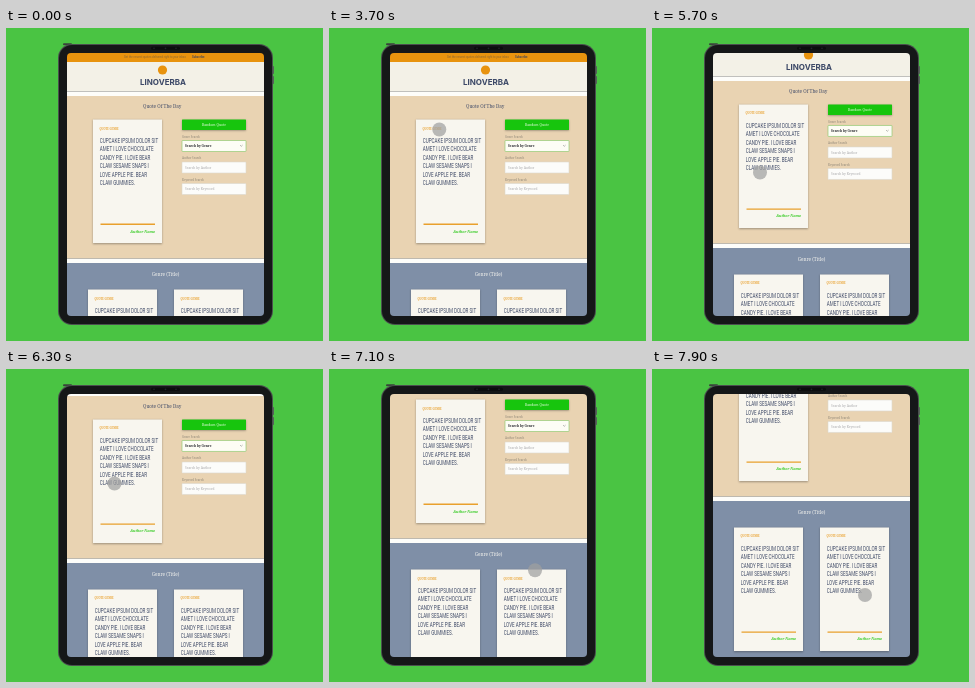
Write an HTML page with a canvas that moves like this. It is 317x313 px and loops after 8 s.

```html
<!DOCTYPE html>
<html lang="en">
<head>
<meta charset="utf-8">
<title>Quote page on a tablet</title>
<style>
  html, body { margin: 0; width: 100%; height: 100%; overflow: hidden; background: #4ac443; }
  canvas { display: block; width: 317px; height: 313px; }
</style>
</head>
<body>
<canvas id="stage"></canvas>
<script>
const W = 317, H = 313, LOOP = 8000;
const SERIF = '"Noto Serif", serif';
const SANS = 'Roboto, sans-serif';
const NAVY = '#414c69', ORANGE = '#e9a02c', PAPER = '#f8f6ef', GREEN = '#35cb22';
const QUOTE = [
  'CUPCAKE IPSUM DOLOR SIT',
  'AMET I LOVE CHOCOLATE',
  'CANDY PIE. I LOVE BEAR',
  'CLAW SESAME SNAPS I',
  'LOVE APPLE PIE. BEAR',
  'CLAW GUMMIES.'
];

const canvas = document.getElementById('stage');
const ctx = canvas.getContext('2d');
const dpr = window.devicePixelRatio || 1;
canvas.width = W * dpr;
canvas.height = H * dpr;

// Keys are [time, value]; smooth and without overshoot.
function track(keys) {
  const last = keys.length - 1;
  const slope = i => (keys[i + 1][1] - keys[i][1]) / (keys[i + 1][0] - keys[i][0]);
  const tangent = i => {
    if (i === 0 || i === last) return 0;
    const a = slope(i - 1), b = slope(i);
    return a * b > 0 ? 2 * a * b / (a + b) : 0;
  };
  return t => {
    if (t <= keys[0][0]) return keys[0][1];
    if (t >= keys[last][0]) return keys[last][1];
    let i = 0;
    while (t >= keys[i + 1][0]) i++;
    const [t0, v0] = keys[i], [t1, v1] = keys[i + 1];
    const d = t1 - t0, u = (t - t0) / d, w = 1 - u;
    return w * w * (1 + 2 * u) * v0 + u * u * (3 - 2 * u) * v1
      + d * u * w * (w * tangent(i) - u * tangent(i + 1));
  };
}

const scrollAt = track([[5100, 0], [5700, 15], [6300, 41], [6650, 56], [7000, 61], [7300, 61], [7900, 103], [8000, 106]]);
const touchX = track([[2600, 159], [3000, 163], [4000, 90], [4300, 84], [4900, 103], [5100, 103], [5700, 108], [6300, 108.5], [6600, 110], [7100, 206], [7350, 213], [8000, 213]]);
const touchY = track([[2600, 76.5], [3000, 77], [4000, 116], [4900, 159.5], [5100, 159.5], [5700, 144.5], [6300, 114.5], [6600, 99], [7100, 201], [7350, 264], [7900, 226], [8000, 223]]);
const touchR = track([[2600, 0], [3000, 7]]);
const arrowAlpha = track([[2050, 0], [2200, 1], [2650, 1], [2950, 0]]);

function box(x, y, w, h, fill, r = 0, stroke) {
  ctx.beginPath();
  ctx.roundRect(x, y, w, h, r);
  ctx.fillStyle = fill;
  ctx.fill();
  if (stroke) {
    ctx.strokeStyle = stroke;
    ctx.lineWidth = 0.6;
    ctx.stroke();
  }
}

function dot(x, y, r, fill) {
  ctx.beginPath();
  ctx.arc(x, y, r, 0, Math.PI * 2);
  ctx.fillStyle = fill;
  ctx.fill();
}

function text(str, x, y, font, fill, align = 'left') {
  ctx.font = font;
  ctx.fillStyle = fill;
  ctx.textAlign = align;
  ctx.fillText(str, x, y);
}

function shadowed(draw) {
  ctx.save();
  ctx.shadowColor = 'rgba(40,40,40,.4)';
  ctx.shadowBlur = 2 * dpr;
  ctx.shadowOffsetY = 0.8 * dpr;
  draw();
  ctx.restore();
}

function card(x, y) {
  shadowed(() => box(x, y, 69, 123.5, PAPER));
  text('QUOTE GENRE', x + 6.5, y + 10, `700 2.6px ${SERIF}`, ORANGE);
  // Narrow display face
  ctx.save();
  ctx.translate(x + 6.8, y + 23.3);
  ctx.scale(0.6, 1);
  QUOTE.forEach((line, i) => text(line, 0, i * 8.45, `400 7.6px ${SANS}`, NAVY));
  ctx.restore();
  box(x + 7.5, y + 104, 54.5, 1.4, ORANGE);
  text('Author Name', x + 62, y + 113, `italic 700 3.6px ${SERIF}`, GREEN, 'right');
}

function field(y, label, hint, active) {
  text(label, 176, y - 2.6, `400 2.8px ${SERIF}`, '#8d8577');
  box(176, y, 64, 11, active ? '#fdfdf5' : '#fcfcfa', 0.5, active ? '#84c763' : '#dcd8cf');
  text(hint, 179, y + 6.8, `${active ? 600 : 400} 3.2px ${SERIF}`, active ? '#23242a' : '#a9a9ab');
}

function page() {
  box(61, -80, 197, 114, '#e8930e');
  text('Get the newest quotes delivered right to your inbox', 118, 30.4, `400 2.75px ${SANS}`, '#8a6736');
  text('Subscribe', 186, 30.4, `700 2.8px ${SANS}`, '#4b4a56');

  box(61, 34, 197, 29.5, '#f3f1e7');
  dot(156.5, 42, 4.6, '#e8930e');
  text('LINOVERBA', 157, 56.8, '700 8px Inter, sans-serif', '#3a4766', 'center');

  box(61, 63.5, 197, 4.5, '#fdfdfa');
  box(61, 68, 197, 162.5, '#e9d3b2');
  text('Quote Of The Day', 156.2, 80.3, `400 4.6px ${SERIF}`, NAVY, 'center');
  card(87, 91.5);

  shadowed(() => box(176, 91.5, 64, 10.5, '#17c50d', 0.5));
  text('Random Quote', 208, 98, `400 3.4px ${SERIF}`, '#e9ffe4', 'center');
  field(112.5, 'Genre Search', 'Search by Genre', true);
  ctx.beginPath();
  ctx.moveTo(234, 117.1);
  ctx.lineTo(235.3, 118.3);
  ctx.lineTo(236.6, 117.1);
  ctx.strokeStyle = '#777';
  ctx.lineWidth = 0.5;
  ctx.stroke();
  field(134, 'Author Search', 'Search by Author');
  field(155.5, 'Keyword Search', 'Search by Keyword');

  box(61, 230.5, 197, 4.5, '#fdfdfa');
  box(61, 235, 197, 220, '#7f8fa7');
  text('Genre (Title)', 159.5, 247.8, `400 4.6px ${SERIF}`, '#f7f6f0', 'center');
  card(82, 261.5);
  card(168, 261.5);
}

function tablet() {
  box(57, 15.2, 9, 2, '#39433b', 1);
  box(266, 38, 2, 8, '#566159', 0.8);
  box(266, 48, 2, 8, '#566159', 0.8);
  box(52, 16, 215, 281, '#4a504e', 14);
  box(53, 17, 213, 279, '#151718', 13);
  box(145, 18.8, 29, 3, '#0b0c0e', 1.5);
  dot(148, 20.3, 0.8, '#25282d');
  dot(159.5, 20.3, 0.9, '#23262d');
  dot(170, 20.3, 0.8, '#25282d');
}

function arrow(alpha) {
  if (alpha <= 0) return;
  ctx.save();
  ctx.globalAlpha = alpha;
  ctx.translate(154.7, 69);
  ctx.beginPath();
  [[0, 0], [0, 8.6], [2, 6.9], [3.7, 10.5], [5.3, 9.8], [3.8, 6.2], [6.4, 6]]
    .forEach(([x, y]) => ctx.lineTo(x, y));
  ctx.closePath();
  ctx.fillStyle = '#fff';
  ctx.fill();
  ctx.strokeStyle = '#3c3c42';
  ctx.lineWidth = 0.8;
  ctx.stroke();
  ctx.restore();
}

function draw(t) {
  ctx.setTransform(dpr, 0, 0, dpr, 0, 0);
  box(0, 0, W, H, '#4ac443');
  tablet();

  ctx.save();
  ctx.beginPath();
  ctx.roundRect(61, 25, 197, 263, 4);
  ctx.clip();
  ctx.translate(0, -scrollAt(t));
  page();
  ctx.restore();

  arrow(arrowAlpha(t));
  const r = touchR(t);
  if (r > 0) dot(touchX(t), touchY(t), r, 'rgba(160,160,160,.72)');
}

const start = performance.now();
function tick() {
  draw((performance.now() - start) % LOOP);
  requestAnimationFrame(tick);
}
tick();
</script>
</body>
</html>
```
